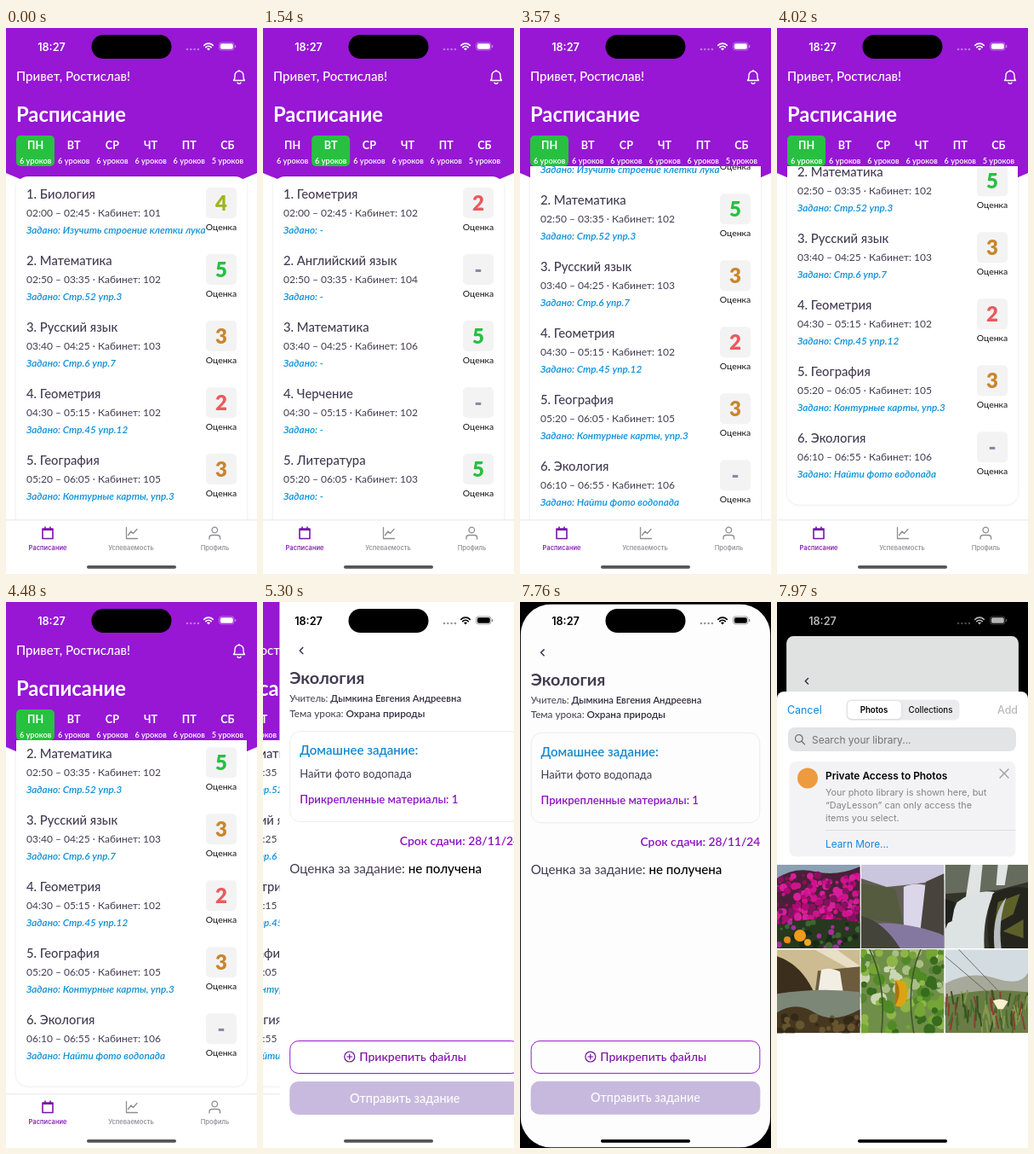
Recreate the animation shown at these times as an HTML page. Size 295 by 640 pixels, loop 8 s.

```html
<!DOCTYPE html>
<html lang="ru">
<head>
<meta charset="utf-8">
<style>
  html, body { margin: 0; width: 100%; height: 100%; overflow: hidden; background: #000; }
  svg { display: block; }
  #stage { width: 100vw; height: 100vh; }
  text { font-family: Lato, "Open Sans", sans-serif; white-space: pre; }
  .ui { font-family: Inter, Roboto, sans-serif; }
  .line { fill: none; stroke-linecap: round; stroke-linejoin: round; }
</style>
</head>
<body>
<svg id="stage" viewBox="0 0 295 640"></svg>
<script>
const LOOP = 8000;
const INK = '#423c52', PURPLE = '#9717d5', GREEN = '#28c041';

const attrs = o => Object.entries(o).map(([k, v]) => `${k}="${v}"`).join(' ');
const text = (x, y, size, weight, fill, str, extra = {}) =>
  `<text x="${x}" y="${y}" font-size="${size}" font-weight="${weight}" fill="${fill}" ${attrs(extra)}>${str}</text>`;
const mid = { 'text-anchor': 'middle' };
const ui = { class: 'ui' };
const rect = (x, y, w, h, r, fill, extra = {}) =>
  `<rect x="${x}" y="${y}" width="${w}" height="${h}" rx="${r}" fill="${fill}" ${attrs(extra)}/>`;
const line = (d, stroke, width = 1.3) =>
  `<path class="line" d="${d}" stroke="${stroke}" stroke-width="${width}"/>`;
const shape = (d, fill) => `<path d="${d}" fill="${fill}"/>`;
const circle = (x, y, r, fill) => `<circle cx="${x}" cy="${y}" r="${r}" fill="${fill}"/>`;

// ---------- schedule ----------
const gradeColors = { 2: '#ea5a5c', 3: '#c9862c', 4: '#9fb51c', 5: GREEN, '-': '#8988a6' };
const hours = ['02:00 – 02:45', '02:50 – 03:35', '03:40 – 04:25',
               '04:30 – 05:15', '05:20 – 06:05', '06:10 – 06:55'];
const monday = [
  ['Биология', 101, 'Изучить строение клетки лука', 4],
  ['Математика', 102, 'Стр.52 упр.3', 5],
  ['Русский язык', 103, 'Стр.6 упр.7', 3],
  ['Геометрия', 102, 'Стр.45 упр.12', 2],
  ['География', 105, 'Контурные карты, упр.3', 3],
  ['Экология', 106, 'Найти фото водопада', '-'],
];
const tuesday = [
  ['Геометрия', 102, '-', 2],
  ['Английский язык', 104, '-', '-'],
  ['Математика', 106, '-', 5],
  ['Черчение', 102, '-', '-'],
  ['Литература', 103, '-', 5],
];

const lesson = ([name, room, task, grade], i) => `<g transform="translate(0 ${i * 78})">
  ${text(24, 199.5, 14.8, 500, INK, `${i + 1}. ${name}`)}
  ${text(24, 221, 12, 400, INK, `${hours[i]} · Кабинет: ${room}`)}
  ${text(24, 240.5, 11.75, 600, '#0d90d7', `Задано: ${task}`, { 'font-style': 'italic' })}
  ${rect(235, 187, 36, 36, 5, '#f3f3f4')}
  ${text(253, 213.5, 24, 900, gradeColors[grade], grade, mid)}
  ${text(253, 237, 10.4, 400, '#111', 'Оценка', mid)}
</g>`;

const tabWidth = 271 / 6;
const dayTab = (day, i) => {
  const x = 12 + tabWidth * (i + 0.5);
  return text(x, 142, 12.6, 700, '#fff', day, mid) +
    text(x, 159, 9.2, 600, '#fff', `${day === 'СБ' ? 5 : 6} уроков`, mid);
};

const navLabel = (x, color, str) => text(x, 611.5, 7.6, 500, color, str, { ...mid, ...ui });
const ACTIVE = '#7a12a8', IDLE = '#8e8e93';

const schedule = `<g id="schedule">
  ${rect(0, 0, 295, 640, 0, '#fff')}
  ${shape('M0 0H295V170L147.5 232L0 170Z', PURPLE)}
  <g clip-path="url(#listClip)"><g id="scroller">
    ${rect(12, 174, 271, 488, 14, '#fff', { filter: 'url(#soft)' })}
    <g id="monday">${monday.map(lesson).join('')}</g>
    <g id="tuesday">${tuesday.map(lesson).join('')}</g>
  </g></g>
  ${text(12, 62, 15.1, 500, '#fff', 'Привет, Ростислав!')}
  ${line('M267.5 61.5C269.5 59.5 269 57 269 55.5A5 5 0 0 1 279 55.5C279 57 278.5 59.5 280.5 61.5ZM272 64.2A2.3 2.3 0 0 0 276 64.2M274 50.3V49.5', '#fff', 1.4)}
  ${text(12, 110, 23.8, 700, '#fff', 'Расписание')}
  ${rect(12, 126, 45, 36, 5, GREEN, { id: 'dayMark' })}
  ${['ПН', 'ВТ', 'СР', 'ЧТ', 'ПТ', 'СБ'].map(dayTab).join('')}
  ${rect(0, 577, 295, 63, 0, '#fff')}
  ${rect(0, 576.5, 295, 0.7, 0, '#dcdcde')}
  ${line('M43 587h12v11.5h-12zM43 588.3h12M46 585v2M52 585v2', ACTIVE, 1.6)}
  ${line('M141.5 585.5V598.5H154.5M143.5 594.5L147 590L149.5 592.5L154 587.5', IDLE)}
  ${line('M242 588.5a3.3 3.3 0 1 0 6.6 0a3.3 3.3 0 1 0 -6.6 0M239 599v-1.5a3 3 0 0 1 3-3h6.6a3 3 0 0 1 3 3v1.5', IDLE)}
  ${navLabel(49, ACTIVE, 'Расписание')}
  ${navLabel(147, IDLE, 'Успеваемость')}
  ${navLabel(245.5, IDLE, 'Профиль')}
</g>`;

// ---------- homework page ----------
const strong = (str, fill) => `<tspan font-weight="600" fill="${fill}">${str}</tspan>`;
const detail = `<g id="detail" clip-path="url(#pageClip)">
  ${rect(0, 0, 295, 640, 0, '#fff')}
  ${line('M27.5 53.5L24 57L27.5 60.5', INK, 1.7)}
  ${text(12, 96, 19.9, 700, INK, 'Экология')}
  ${text(12, 117, 11.3, 400, INK, 'Учитель: ' + strong('Дымкина Евгения Андреевна', '#332e40'))}
  ${text(12, 134.5, 11.8, 400, INK, 'Тема урока: ' + strong('Охрана природы', '#332e40'))}
  ${rect(12.5, 151.5, 270, 106, 12, '#fff', { stroke: '#ededf0' })}
  ${text(24, 179, 15, 600, '#1487cf', 'Домашнее задание:')}
  ${text(24, 205.5, 13, 400, INK, 'Найти фото водопада')}
  ${text(24, 236, 13.2, 600, '#8c12c4', 'Прикрепленные материалы: 1')}
  ${text(283, 284.5, 13.9, 600, '#8c12c4', 'Срок сдачи: 28/11/24', { 'text-anchor': 'end' })}
  ${text(12, 318, 15.2, 400, INK, 'Оценка за задание: <tspan font-weight="500" fill="#000">не получена</tspan>')}
  <g id="attach">
    ${rect(12.5, 514.5, 270, 38, 10, '#fff', { stroke: PURPLE })}
    ${line('M76.5 533a6 6 0 1 0 12 0a6 6 0 1 0 -12 0M79.5 533h6M82.5 530v6', '#6a1094', 1.2)}
    ${text(94, 538, 14, 500, '#7d10a8', 'Прикрепить файлы')}
  </g>
  ${rect(12, 562, 271, 39, 10, '#c8badf')}
  ${text(147.5, 586.5, 14.4, 500, '#fff', 'Отправить задание', mid)}
  ${rect(0, 0, 295, 640, 0, '#102020', { id: 'dim', opacity: 0 })}
</g>`;

// ---------- photo picker ----------
let seed = 7;
const rnd = () => (seed = seed * 16807 % 2147483647) / 2147483647;
const scatter = (n, colors, y0, y1, r) => Array.from({ length: n }, (_, i) =>
  circle((rnd() * 98).toFixed(1), (y0 + rnd() * (y1 - y0)).toFixed(1), (r * (0.5 + rnd())).toFixed(1), colors[i % colors.length])).join('');
const blades = (n, colors, y0) => Array.from({ length: n }, (_, i) => {
  const x = rnd() * 98, y = y0 + rnd() * (98 - y0);
  return line(`M${x.toFixed(1)} ${y.toFixed(1)}l${(rnd() * 8 - 4).toFixed(1)} -14`, colors[i % colors.length], 2);
}).join('');

const photos = [
  rect(0, 0, 98, 98, 0, '#8ca0b4') + shape('M0 16Q20 2 45 8T98 2V98H0Z', '#4a2038') +
    scatter(170, ['#d0138f', '#b00a76', '#d81f9a', '#85125f'], 12, 68, 3.2) +
    shape('M0 72Q40 58 98 68V98H0Z', '#26391f') +
    scatter(40, ['#3f6530', '#1b2a18', '#a62f9c'], 66, 98, 3) +
    circle(27, 83, 7, '#f29a1c') + circle(36, 91, 4, '#f2a524') + circle(12, 88, 4, '#e78a1c'),
  rect(0, 0, 98, 98, 0, '#c9c6de') + shape('M0 16L30 26L50 24L98 18V98H0Z', '#615d54') +
    shape('M50 26Q62 20 76 24L72 78H50Z', '#dcd6ea') +
    shape('M0 22L40 28L50 70L0 62Z', '#555b3e') + shape('M76 20L98 10V98L70 74Z', '#48433c') +
    shape('M0 72Q30 64 70 74T98 90V98H0Z', '#8578a0') + shape('M0 60Q26 66 46 98H0Z', '#44443a'),
  rect(0, 0, 98, 98, 0, '#34352a') + shape('M0 0H98V20L60 30L0 34Z', '#656c5e') +
    shape('M30 0H44L40 40H24ZM62 0H74L70 24H60Z', '#e0e4e3') +
    shape('M14 44Q34 28 58 32Q44 60 46 98H0V76Z', '#dde2e3') +
    shape('M56 34Q80 22 98 28V98H52Q46 66 56 34Z', '#25251d') +
    shape('M62 44L88 34L80 58L58 70ZM68 78L92 64V86Z', '#5d6129') +
    shape('M0 40L12 44L8 66L0 70Z', '#1f211c') + shape('M72 38Q62 66 66 98H58Q54 60 72 38Z', '#b8bfc1'),
  rect(0, 0, 98, 98, 0, '#cdbb92') + shape('M0 0H44L98 30V20L70 0Z', '#e8dfc6') +
    shape('M0 8Q24 16 38 40L48 58H0Z', '#3c2e1c') + shape('M48 25L98 20V56H44Z', '#6d5b3d') +
    shape('M52 24Q62 20 74 26L78 52H48Z', '#f2eee4') + shape('M0 52Q50 44 98 50V80H0Z', '#7c8778') +
    shape('M0 74Q22 60 44 74T98 70V98H0Z', '#463720') + scatter(30, ['#66552f', '#332917'], 78, 98, 4),
  rect(0, 0, 98, 98, 0, '#6f8f48') + scatter(40, ['#a9be84', '#cbd6b2', '#58803a'], 0, 60, 5) +
    scatter(80, ['#4f8a25', '#74a535', '#376b1d', '#8fb548'], 0, 98, 5) +
    line('M10 0Q30 40 24 98M70 0Q52 40 62 98', '#43552b', 1.6) +
    shape('M40 36Q58 34 54 58Q50 70 40 66Z', '#dca414') + shape('M40 36Q50 48 40 66Z', '#a87412'),
  rect(0, 0, 98, 98, 0, '#d3dce0') + shape('M0 40Q30 24 60 34T98 26V64H0Z', '#a7a99a') +
    shape('M0 56Q40 44 98 50V98H0Z', '#687d46') +
    blades(80, ['#4b6a2d', '#86994c', '#8d3d35', '#38521f'], 62) +
    line('M0 8L52 52M16 0L62 48', '#57524a', 0.8) +
    shape('M56 60Q65 56 74 61L68 70H62Z', '#f6f1cf'),
].map((art, i) => `<svg x="${i % 3 * 98.8}" y="${308 + 99.3 * Math.floor(i / 3)}" width="97.5" height="98">${art}</svg>`).join('');

const BLUE = '#1285e0', GREY = '#85858a';
const sheet = `<g id="sheet">
  ${rect(0, 105, 295, 640, 8, '#fff')}
  ${text(12, 131, 12.4, 400, BLUE, 'Cancel', ui)}
  ${rect(81.5, 114.5, 133, 24, 6, '#ebebed')}
  ${rect(83, 116, 63, 21, 5, '#fff', { filter: 'url(#soft)' })}
  ${text(114, 130, 9.7, 600, '#000', 'Photos', { ...mid, ...ui })}
  ${text(180.5, 130, 9.7, 500, '#111', 'Collections', { ...mid, ...ui })}
  ${text(283, 131, 12.4, 500, '#b9b9bd', 'Add', { ...ui, 'text-anchor': 'end' })}
  ${rect(13, 147, 268, 28, 8, '#e2e4e5')}
  ${line('M21.5 160a4.3 4.3 0 1 0 8.6 0a4.3 4.3 0 1 0 -8.6 0M29 163.3L32.5 166.8', '#737378')}
  ${text(41, 165.5, 11.9, 400, '#737378', 'Search your library...', ui)}
  ${rect(14.5, 187, 266, 111.5, 8, '#f3f3f5')}
  ${circle(36, 206.5, 12, '#ee9a3e')}
  ${text(57, 208, 11.9, 600, '#000', 'Private Access to Photos', ui)}
  ${line('M262 196L272 206M272 196L262 206', '#9a9a9f')}
  ${['Your photo library is shown here, but', '“DayLesson” can only access the', 'items you select.']
    .map((s, i) => text(57, 227 + 15 * i, 10.9, 400, GREY, s, ui)).join('')}
  ${rect(57, 267, 223.5, 0.7, 0, '#d4d4d8')}
  ${text(57, 287.5, 11.8, 400, BLUE, 'Learn More...', ui)}
  ${photos}
</g>`;

// ---------- system overlay ----------
const TINT = 'currentColor';
const system = `${rect(100.5, 8, 94, 28, 14, '#000')}
<g id="status">
  ${text(53.5, 26.5, 12.7, 600, TINT, '18:27', { ...mid, ...ui })}
  <g opacity=".4">${[0, 1, 2, 3].map(i => circle(213 + 4.3 * i, 25, 1.3, TINT)).join('')}</g>
  ${line('M232.8 20.3a7.5 7.5 0 0 1 10.4 0M234.8 22.7a4.6 4.6 0 0 1 6.4 0', TINT, 1.7)}
  ${shape('M236 24.3a3 3 0 0 1 4 0L238 26.5Z', TINT)}
  ${rect(250.5, 17, 17.5, 9, 2.8, 'none', { stroke: TINT, 'stroke-opacity': 0.45, 'stroke-width': 0.8 })}
  ${rect(251.8, 18.3, 15, 6.4, 1.8, TINT)}
  ${rect(269, 20, 1.2, 3, 0.6, TINT, { opacity: 0.5 })}
</g>
${rect(95, 630, 105, 3.7, 1.8, '#555', { id: 'home' })}`;

document.getElementById('stage').innerHTML = `<defs>
  <clipPath id="listClip">${rect(0, 162, 295, 415, 0, '#000')}</clipPath>
  <clipPath id="pageClip">${rect(0, 0, 295, 640, 0, '#000', { id: 'pageShape' })}</clipPath>
  <filter id="soft" x="-10%" y="-20%" width="120%" height="140%">
    <feDropShadow dx="0" dy="0.5" stdDeviation="1.5" flood-opacity=".12"/>
  </filter>
</defs>${rect(0, 0, 295, 640, 0, '#000') + schedule + detail + sheet + system}`;

// ---------- motion ----------
const $ = Object.fromEntries([...document.querySelectorAll('[id]')].map(el => [el.id, el]));
const clamp = v => Math.min(1, Math.max(0, v));
const set = (el, name, value) => el.setAttribute(name, value);
const show = (el, visible) => set(el, 'visibility', visible ? 'visible' : 'hidden');

// Time held at the latest of n evenly spaced updates.
const stepped = (t, start, end, n) => {
  const gap = (end - start) / (n - 1);
  return Math.min(end, start + Math.floor((t - start) / gap + 0.1) * gap);
};

function scrollAt(t) {
  if (t < 3350) return 0;
  const s = (stepped(t, 3350, 4480, 11) - 3350) / 1000;
  return 95 * (1 - Math.exp(-3.5 * s) * Math.cos(4.3 * s));
}

function pushOffset(t) {
  if (t < 5080) return 1;
  if (t >= 5810) return 0;
  const s = 17 * (stepped(t, 5080, 5540, 5) - 5050) / 1000;
  return (1 + s) * Math.exp(-s);
}

function modalAt(t) {
  const u = clamp((stepped(t, 7530, 7970, 5) - 7710) / 260);
  return u * u * (3 - 2 * u);
}

function render(t) {
  set($.dayMark, 'x', 12 + (t >= 850 && t < 2380 ? tabWidth : 0));
  const other = t >= 1540 && t < 3350;
  show($.monday, !other);
  show($.tuesday, other);
  set($.scroller, 'transform', `translate(0 ${-scrollAt(t)})`);

  const offset = pushOffset(t), modal = modalAt(t);
  show($.detail, offset < 1);
  set($.schedule, 'transform', `translate(${-88 * (1 - offset)} 0)`);
  set($.schedule, 'display', modal > 0 ? 'none' : 'inline');

  const scale = 1 - 0.075 * modal;
  set($.detail, 'transform', `translate(${295 * offset + 147.5 * (1 - scale)} ${40 * modal}) scale(${scale})`);
  set($.pageShape, 'rx', modal > 0 ? 38 - 29 * modal : 0);
  set($.dim, 'opacity', 0.13 * modal);

  const press = clamp((stepped(t, 6390, 6930, 6) - 6390) / 540);
  set($.attach, 'opacity', 1 - 0.4 * Math.sin(Math.PI * press));

  // The sheet follows slightly after the page starts to shrink.
  const rise = clamp((modal - 0.07) / 0.93);
  show($.sheet, rise > 0);
  set($.sheet, 'transform', `translate(0 ${535 * (1 - rise)})`);

  $.status.style.color = modal > 0.3 ? '#b5b5b5' : offset < 0.5 ? '#000' : '#fff';
  set($.home, 'fill', modal > 0 ? '#000' : '#555');
}

const begin = performance.now();
function frame() {
  render((performance.now() - begin) % LOOP);
  requestAnimationFrame(frame);
}
frame();
</script>
</body>
</html>
```
